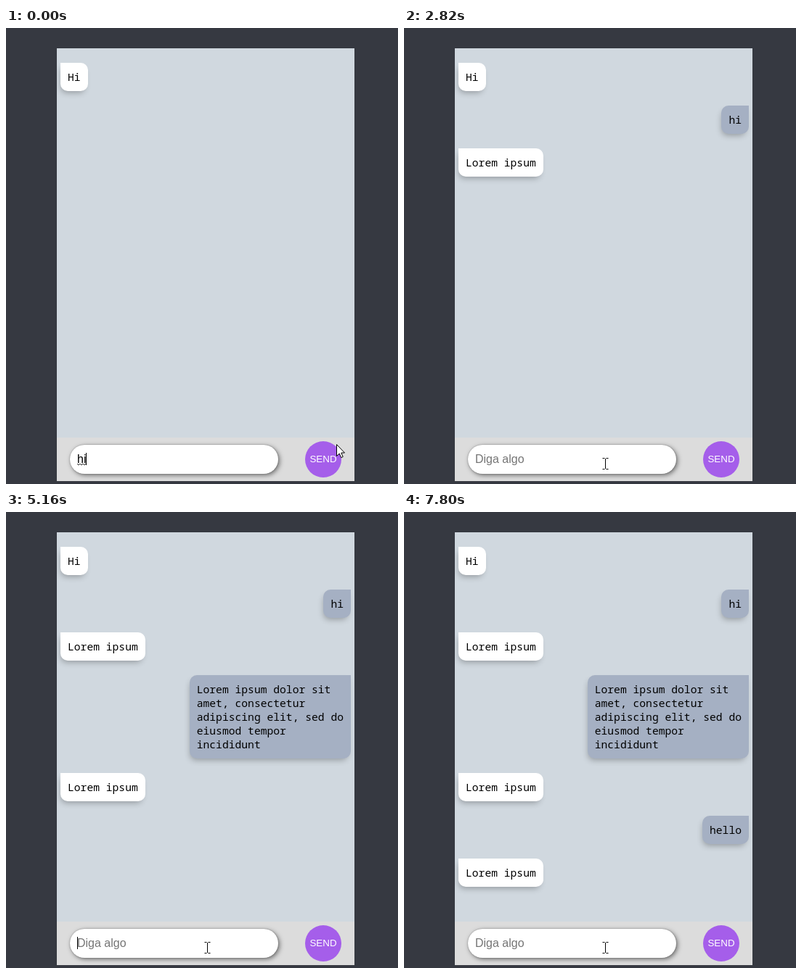
These frames come from a looping animation (540x629 px, 8000 ms). An HTML page:

```html
<!DOCTYPE html>
<html lang="en">
<head>
<meta charset="utf-8">
<title>Chat</title>
<style>
  html, body { margin: 0; width: 100%; height: 100%; overflow: hidden; background: #363941; }
  body * { position: absolute; box-sizing: border-box; }
  #chat { left: 70px; top: 28px; width: 410px; height: 537px; background: #d0d8df; overflow: hidden; }
  #footer { left: 70px; top: 565px; width: 410px; height: 60px; background: #dcdcdc; }
  .bubble {
    padding: 10px; white-space: pre; color: #000;
    font: 14.66px/19px "Noto Sans Mono", monospace;
    box-shadow: -2px 5px 8px -3px rgba(0, 0, 0, .3);
  }
  .bot { left: 5px; background: #fff; border-radius: 0 10px 10px 10px; transform-origin: left center; }
  .user { right: 5px; background: #a5b0c3; border-radius: 10px 0 10px 10px; transform-origin: right top; }
  #input {
    left: 88px; top: 575px; width: 287px; height: 40px; border-radius: 20px; background: #fff;
    box-shadow: 2px 2px 6px rgba(0, 0, 0, .5), 0 0 2px rgba(0, 0, 0, .3);
  }
  #field {
    left: 98px; top: 586px; width: 267px; height: 18px; overflow: hidden; white-space: pre;
    font: 16px/18px "Liberation Sans", Arial, sans-serif;
  }
  #field span { position: static; }
  #field .caret { display: inline-block; width: 1px; height: 17px; vertical-align: top; background: #000; }
  #hint { color: #757575; margin-left: -1px; }
  #send {
    left: 412px; top: 570px; width: 50px; height: 50px; border-radius: 50%;
    background: #a55eea; color: #fff; text-align: center;
    font: 13.333px/50px "Liberation Sans", Arial, sans-serif;
  }
  svg { left: 0; top: 0; }
</style>
</head>
<body>
<div id="chat"></div>
<div id="footer"></div>
<div id="input"></div>
<div id="field"><span id="typed"></span><span class="caret" id="caret"></span><span id="hint">Diga algo</span></div>
<div id="send">SEND</div>
<svg width="540" height="629" fill="none">
  <path id="squiggle" d="M98 601l2 2 2-2 2 2 2-2 2 2 2-2" stroke="#333"/>
  <path id="arrow" d="M.5 .5V16.5L4.2 13 6.7 18.6 9.2 17.5 6.8 12H11.5Z" fill="#fff" stroke="#000"/>
  <path id="beam" d="M-4 -7.5h3M1 -7.5h3M-4 7.5h3M1 7.5h3M0 -7V7" stroke="#000"/>
</svg>
<script>
const LOOP = 8000, STEP = 77, GROW = 400, BLINK = 530;
const $ = id => document.getElementById(id);

const lines = ["Lorem ipsum dolor sit", "amet, consectetur", "adipiscing elit, sed do", "eiusmod tempor", "incididunt"];

// Each exchange starts at `show`; bubbles grow from their own start times.
const exchanges = [
  { show: 790, user: 729, bot: 1069 },
  { show: 4070, user: 4009, bot: 4338 },
  { show: 7100, user: 7039, bot: 7370 },
];

function addBubble(kind, text, y, start = -GROW) {
  const el = document.createElement("div");
  el.className = "bubble " + kind;
  el.textContent = text;
  el.style.top = y - 28 + "px";
  $("chat").append(el);
  return { el, start };
}

addBubble("bot", "Hi", 48);
const replies = [["hi", 107, 166], [lines.join("\n"), 225, 360], ["hello", 419, 478]];
const bubbles = replies.flatMap(([text, userY, botY], i) => [
  { ...addBubble("user", text, userY, exchanges[i].user), show: exchanges[i].show },
  { ...addBubble("bot", "Lorem ipsum", botY, exchanges[i].bot), show: exchanges[i].show },
]);

// [time, text]
const typing = [
  [0, "hi"], [790, ""], [3200, lines.join(" ")], [4070, ""],
  [5770, "h"], [5860, "he"], [6090, "hel"], [6240, "hell"], [6640, "hello"], [7100, ""],
];

// Moments that restart the caret blink; the first one precedes the loop.
const carets = [-200, 2270, 3200, 4070, 5770, 5860, 6090, 6240, 6640, 7100];

// [time, x, y]
const pointer = [
  [0, 455, 574], [110, 458, 575], [190, 460, 577], [260, 452, 581], [330, 444, 585], [410, 439, 588],
  [1270, 437, 590], [1340, 425, 592], [1420, 400, 594], [1500, 365, 594], [1570, 332, 590],
  [1650, 315, 591], [1720, 300, 594], [1800, 290, 597], [1880, 282, 600], [1950, 277.5, 601],
];

const latest = (keys, t) => keys.findLast(key => key[0] <= t);

// CSS "ease" curve, solved by bisection.
function ease(x) {
  const bezier = (a, b, u) => 3 * a * u * (1 - u) ** 2 + 3 * b * u * u * (1 - u) + u ** 3;
  let lo = 0, hi = 1;
  for (let i = 0; i < 20; i++) {
    const mid = (lo + hi) / 2;
    if (bezier(.25, .25, mid) < x) lo = mid; else hi = mid;
  }
  return bezier(.1, 1, lo);
}

function drawBubble({ el, show, start }, t) {
  const sampled = show + Math.floor((t - show) / STEP) * STEP;
  const progress = (sampled - start) / GROW;
  el.style.visibility = t >= show && progress >= 0 ? "visible" : "hidden";
  const scale = progress > .88 ? 1 : .5 + .5 * ease(Math.max(0, progress));
  el.style.transform = scale < 1 ? `scale(${scale})` : "none";
}

function drawInput(t) {
  const text = latest(typing, t)[1];
  const focused = t < 560 || t >= 2270;
  const sinceKey = t - carets.findLast(time => time <= t);
  const caretOn = focused && Math.floor(sinceKey / BLINK) % 2 === 0;
  if ($("typed").textContent !== text) $("typed").textContent = text;
  $("hint").style.display = text ? "none" : "";
  $("caret").style.visibility = caretOn ? "visible" : "hidden";
  $("field").scrollLeft = $("field").scrollWidth;
  $("squiggle").style.display = t < 560 ? "" : "none";
  $("send").style.top = (t >= 560 && t < 790 ? 572 : 570) + "px";
}

function drawPointer(t) {
  const [, x, y] = latest(pointer, t);
  const overInput = x < 375;
  $("arrow").style.display = overInput ? "none" : "";
  $("beam").style.display = overInput ? "" : "none";
  $(overInput ? "beam" : "arrow").setAttribute("transform", `translate(${x} ${y})`);
}

const begin = performance.now();
function frame() {
  const t = (performance.now() - begin) % LOOP;
  bubbles.forEach(bubble => drawBubble(bubble, t));
  drawInput(t);
  drawPointer(t);
  requestAnimationFrame(frame);
}
frame();
</script>
</body>
</html>
```
